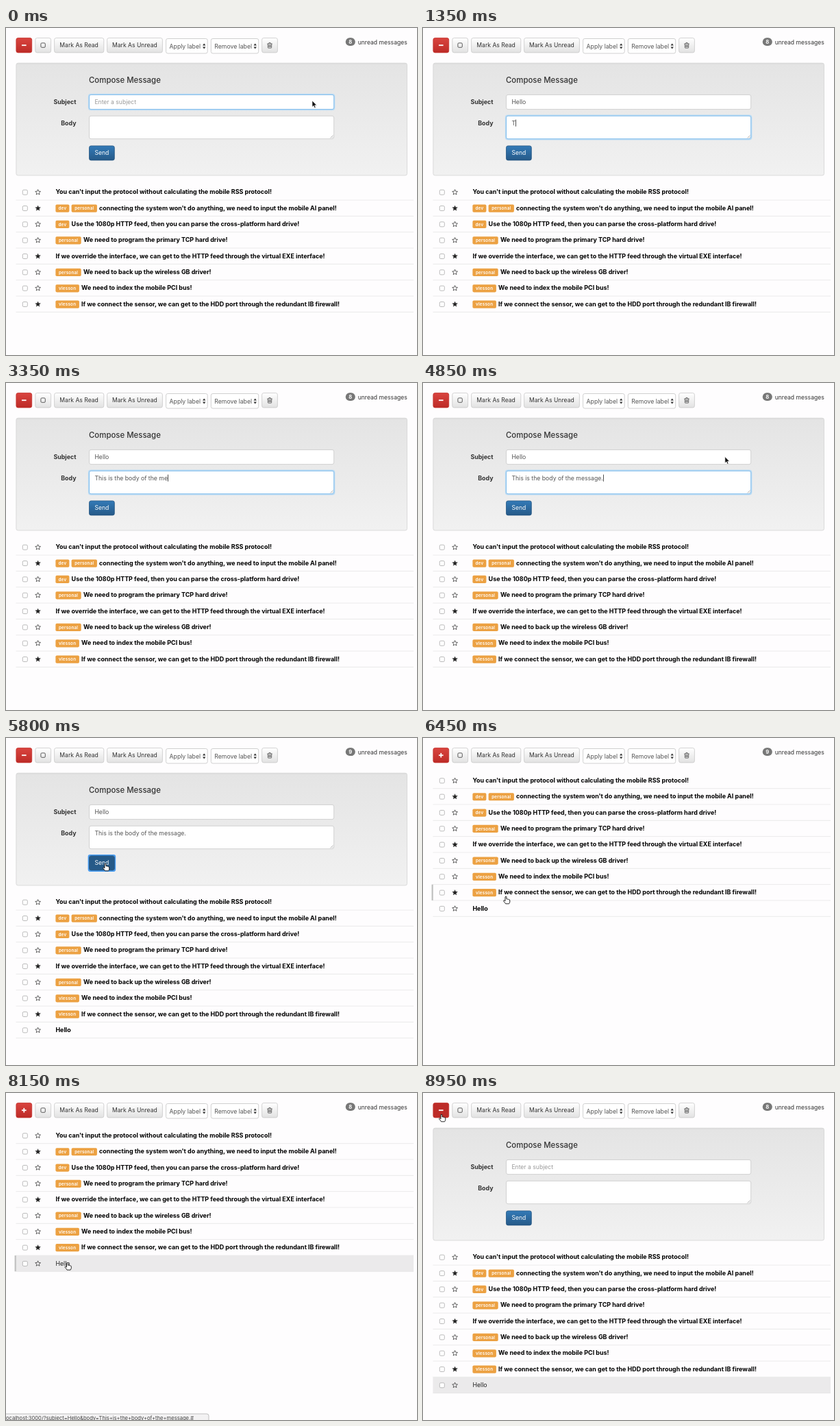
Write an HTML page that moves like this. It is 600 by 477 pixels and loops after 9 s.

```html
<!DOCTYPE html>
<html lang="en">
<head>
<meta charset="utf-8">
<title>Inbox</title>
<style>
html, body { margin: 0; width: 100%; height: 100%; overflow: hidden; background: #fefdfe; }
svg { display: block; width: 600px; height: 477px; }
text { font: 8.6px Inter, "Open Sans", sans-serif; fill: #333; white-space: pre; }
.bold { font-size: 8.96px; font-weight: 700; fill: #000; }
.plain { font-size: 8.8px; fill: #222; }
.label { font-size: 8.9px; font-weight: 700; text-anchor: end; }
.title { font-size: 11.42px; font-weight: 500; }
.tag { font-size: 6.3px; font-weight: 600; letter-spacing: 0.2px; fill: #fff; text-anchor: middle; }
.badge { font-size: 7.6px; font-weight: 700; fill: #fff; text-anchor: middle; }
.hint { fill: #999; }
.typed { font-size: 8.68px; fill: #555; }
.white { fill: #fff; }
.status { font-size: 7.6px; text-anchor: end; fill: #444; }
</style>
</head>
<body>
<svg id="stage" viewBox="0 0 600 477">
  <defs>
    <linearGradient id="gray" x2="0" y2="1"><stop stop-color="#fff"/><stop offset="1" stop-color="#e2e2e2"/></linearGradient>
    <linearGradient id="red" x2="0" y2="1"><stop stop-color="#d9443f"/><stop offset="1" stop-color="#bd2b27"/></linearGradient>
    <linearGradient id="blue" x2="0" y2="1"><stop stop-color="#337ab7"/><stop offset="1" stop-color="#265a88"/></linearGradient>
    <linearGradient id="well" x2="0" y2="1"><stop stop-color="#e4e4e4"/><stop offset="1" stop-color="#f1f1f1"/></linearGradient>
  </defs>
</svg>
<script>
const LOOP = 9000, ROW_H = 23.33, PANEL_H = 177.4;
const SUBJECT = "Hello", BODY = "This is the body of the message.";
const TIMES = { subject: 350, tab: 1130, body: 1310, send: 5550, sent: 5600, close: 6120,
  linkOn: 6900, read: 7300, linkOff: 8260, open: 8700 };
const TAG_W = { dev: 20, personal: 37.3, vlesson: 34.5 };
const ROWS = [
  [0, [], "You can't input the protocol without calculating the mobile RSS protocol!"],
  [1, ["dev", "personal"], "connecting the system won't do anything, we need to input the mobile AI panel!"],
  [0, ["dev"], "Use the 1080p HTTP feed, then you can parse the cross-platform hard drive!"],
  [0, ["personal"], "We need to program the primary TCP hard drive!"],
  [1, [], "If we override the interface, we can get to the HTTP feed through the virtual EXE interface!"],
  [0, ["personal"], "We need to back up the wireless GB driver!"],
  [0, ["vlesson"], "We need to index the mobile PCI bus!"],
  [1, ["vlesson"], "If we connect the sensor, we can get to the HDD port through the redundant IB firewall!"],
  [0, [], SUBJECT]
];
// Pointer stops: time, x, y of the tip
const STOPS = [[4800, 447, 106], [5400, 145, 183], [5800, 145, 183], [6080, 27, 30], [6180, 27, 30],
  [6450, 121, 231], [6900, 89.5, 247.3], [8180, 89.5, 247.3], [8570, 27, 31], [9000, 27, 31]];

const stage = document.getElementById("stage");

function add(parent, tag, attrs, content) {
  const el = document.createElementNS("http://www.w3.org/2000/svg", tag);
  for (const key in attrs) el.setAttribute(key, attrs[key]);
  if (content !== undefined) el.textContent = content;
  return parent.appendChild(el);
}
const group = (parent) => add(parent, "g", {});
const rect = (p, x, y, width, height, fill, stroke = "none", rx = 2.6) =>
  add(p, "rect", { x, y, width, height, fill, stroke, rx, "stroke-width": 0.8 });
const text = (p, x, y, content, cls = "") => add(p, "text", { x, y, class: cls }, content);
const path = (p, d, fill, stroke = "none", width = 0.8) =>
  add(p, "path", { d, fill, stroke, "stroke-width": width, "stroke-linejoin": "round" });
const show = (el, on) => el.setAttribute("visibility", on ? "inherit" : "hidden");
const clamp = (v, a, b) => Math.min(b, Math.max(a, v));

function star(parent, cx, cy, filled) {
  const pts = Array.from({ length: 10 }, (_, i) => {
    const r = i % 2 ? 1.85 : 4.1, a = (i / 5 - 0.5) * Math.PI;
    return (cx + r * Math.cos(a)).toFixed(2) + "," + (cy + r * Math.sin(a)).toFixed(2);
  });
  path(parent, "M" + pts.join("L") + "Z", filled ? "#222" : "none", "#333", filled ? 0.3 : 0.75);
}

function select(parent, x, w, label) {
  rect(parent, x, 15.5, w, 21.5, "#fff", "#c4c4c4");
  text(parent, x + 5, 29.7, label, "typed");
  const a = x + w - 5;
  path(parent, `M${a - 2.2} 25.4h4.4l-2.2-3zM${a - 2.2} 27.6h4.4l-2.2 3z`, "#333");
}

// Toolbar
const bar = group(stage);
const toggle = rect(bar, 14.9, 14.6, 22.8, 21.3, "url(#red)", "#c2312d");
path(bar, "M23 25.2h6.6", "none", "#fff", 1.8);
const plus = path(bar, "M26.3 21.9v6.6", "none", "#fff", 1.8);
for (const [x, w] of [[42.8, 22.8], [70.6, 72.2], [147.6, 80.8], [373.6, 22.8]])
  rect(bar, x, 14.6, w, 21.3, "url(#gray)", "#c8c8c8");
rect(bar, 50.9, 21.9, 6.4, 6.4, "none", "#333", 1.4);
text(bar, 78.3, 28.2, "Mark As Read");
text(bar, 155, 28.2, "Mark As Unread");
select(bar, 233.6, 60.6, "Apply label");
select(bar, 299.3, 69.4, "Remove label");
path(bar, "M381.3 23h7.4M383.5 22.8l.6-1.4h1.8l.6 1.4M382.2 23l.2 5.6q0 .6.7.6h3.8q.7 0 .7-.6l.2-5.6M383.8 24.5v3.4M385 24.5v3.4M386.2 24.5v3.4", "none", "#333", 0.7);
rect(bar, 495.8, 14.3, 14, 11.8, "#777", "none", 5.9);
const count = text(bar, 502.8, 22.9, "8", "badge");
text(bar, 513.7, 24.3, "unread messages");

// Compose panel
const panel = group(stage);
rect(panel, 14.9, 51.2, 570.6, 163.8, "url(#well)", "#d4d4d4");
path(panel, "M16 52h568.4", "none", "#d8d8d8", 1);
text(panel, 121, 79.6, "Compose Message", "title");
text(panel, 102.5, 110.8, "Subject", "label");
text(panel, 102.5, 142, "Body", "label");

function field(y, h, base) {
  const glow = rect(panel, 120.6, y - 0.9, 359, h + 1.8, "none", "#bcdcf4", 3.2);
  glow.setAttribute("stroke-width", 1.6);
  const box = rect(panel, 121.5, y, 357.2, h, "#fff", "#c8c8c8");
  const value = text(panel, 129.4, base, "", "typed");
  const caret = rect(panel, 0, base - 8, 0.8, 10, "#222", "none", 0);
  return (content, focused, caretOn) => {
    show(glow, focused);
    box.setAttribute("stroke", focused ? "#66afe9" : "#c8c8c8");
    value.textContent = content;
    caret.setAttribute("x", 129.6 + (content ? value.getComputedTextLength() : 0));
    show(caret, focused && caretOn);
  };
}
const subject = field(97.4, 21.2, 111.4);
const hint = text(panel, 129.4, 111.4, "Enter a subject", "hint");
const body = field(128.3, 33.4, 141.6);
path(panel, "M473.5 160.5l4-4M475.8 160.5l1.8-1.8", "none", "#888", 0.6);
const ring = rect(panel, 120.7, 171, 38.4, 22.8, "none", "#4a9df0", 2);
ring.setAttribute("stroke-width", 2.2);
const send = rect(panel, 121.5, 171.9, 36.8, 21, "url(#blue)", "#245580");
text(panel, 129.5, 185.4, "Send", "white");

// Message list, laid out for the closed panel
const list = group(stage);
const rows = ROWS.map(([starred, tags, subjectText], i) => {
  const g = group(list), cy = 62 + i * ROW_H, top = cy - ROW_H / 2;
  const back = rect(g, 14.5, top, 580.5, ROW_H, "#ebeaeb", "none", 0);
  const edge = rect(g, 12.6, top, 2.2, ROW_H, "#c0c0c0", "none", 0);
  path(g, `M14.5 ${top + ROW_H}H595`, "none", "#e2e2e2", 0.7);
  rect(g, 24.3, cy - 3.2, 7, 7, "#fff", "#aaa", 1.6);
  star(g, 46.6, cy + 0.3, starred);
  let x = 72.4;
  for (const tag of tags) {
    rect(g, x, cy - 5.2, TAG_W[tag], 11.2, "#eca142", "none", 1.8);
    text(g, x + TAG_W[tag] / 2, cy + 2.7, tag, "tag");
    x += TAG_W[tag] + 3.2;
  }
  const line = text(g, x, cy + 3.1, subjectText, "bold");
  return { g, back, edge, line, top };
});
const fresh = rows[rows.length - 1];

// Link address at the bottom
const status = group(stage);
path(status, "M-2 468H293q3 0 3 3V479H-2Z", "#f3f2f3", "#b0b0b0");
text(status, 274, 476.6, "localhost:3000/?subject=Hello&body=This+is+the+body+of+the+message.#", "status");

// Pointers, tip at the origin
const arrow = path(stage, "M0 0V9.2L2.1 7.3 3.6 10.7 5.1 10 3.7 6.8H6.6Z", "#111", "#fff", 0.6);
const hand = path(stage, "M-1 .8Q0-.6 1 .8V4Q2 3.2 2.7 4.3 3.8 3.6 4.3 4.8 5.8 4.5 5.8 6V8Q5.6 9.4 4.6 10.8H-.4Q-1.5 9-3.2 7.2-3.8 5.8-2.4 5.7L-1 6.8Z", "#fff", "#111", 0.9);

function pointerAt(t) {
  if (t <= STOPS[0][0]) return [STOPS[0][1], STOPS[0][2]];
  const i = STOPS.findIndex((s) => s[0] > t);
  const [t0, x0, y0] = STOPS[i - 1], [t1, x1, y1] = STOPS[i];
  const p = (t - t0) / (t1 - t0), e = p * p * (3 - 2 * p);
  return [x0 + (x1 - x0) * e, y0 + (y1 - y0) * e];
}

const typed = (s, t, start, step) => s.slice(0, clamp(Math.floor((t - start) / step) + 1, 0, s.length));

function draw(t) {
  const T = TIMES;
  const open = t < T.close || t >= T.open;
  const isRead = t >= T.read, sent = t >= T.sent;
  const [x, y] = pointerAt(t);
  const inside = (l, top, r, b) => x >= l && x <= r && y >= top && y <= b;
  const shift = open ? PANEL_H : 0;

  const overToggle = inside(14.5, 14.5, 38, 36);
  toggle.setAttribute("fill", overToggle ? "#bd2c28" : "url(#red)");
  show(plus, !open);
  count.textContent = sent && !isRead ? 9 : 8;

  show(panel, open);
  const blank = t >= T.open;
  const head = blank ? "" : typed(SUBJECT, t, T.subject, 100);
  const message = blank ? "" : typed(BODY, t, T.body, 80);
  const busy = (t > T.subject && t < 800) || (t > T.tab && t < 3850);
  const blink = busy || Math.floor(t / 500) % 2 === 1;
  subject(head, t < T.tab, blink);
  show(hint, !head);
  body(message, t >= T.tab && t < T.send, blink);
  const overSend = open && inside(121, 171.5, 158.5, 193);
  const sendFocused = t >= T.send && !blank;
  show(ring, open && sendFocused);
  send.setAttribute("fill", overSend || sendFocused ? "#265a88" : "url(#blue)");

  list.setAttribute("transform", `translate(0 ${shift})`);
  let overLink = false;
  for (const row of rows) {
    const over = inside(13, row.top + shift, 595, row.top + shift + ROW_H - 0.01);
    show(row.edge, over);
    show(row.back, row === fresh && isRead);
    if (over && x > 72) overLink = true;
  }
  // Hidden rows must not leave their hover edge behind
  fresh.g.setAttribute("display", sent ? "inline" : "none");
  fresh.line.setAttribute("class", isRead ? "plain" : "bold");
  show(status, t >= T.linkOn && t < T.linkOff);

  const visible = t < T.subject || t >= STOPS[0][0];
  const pointing = overToggle || overSend || overLink;
  for (const [el, on] of [[arrow, !pointing], [hand, pointing]]) {
    el.setAttribute("transform", `translate(${x} ${y})`);
    show(el, visible && on);
  }
}

// The ring and carets inherit the panel's visibility
const start = performance.now();
function tick(now) {
  draw(Math.max(0, now - start) % LOOP);
  requestAnimationFrame(tick);
}
draw(0);
requestAnimationFrame(tick);
</script>
</body>
</html>
```
